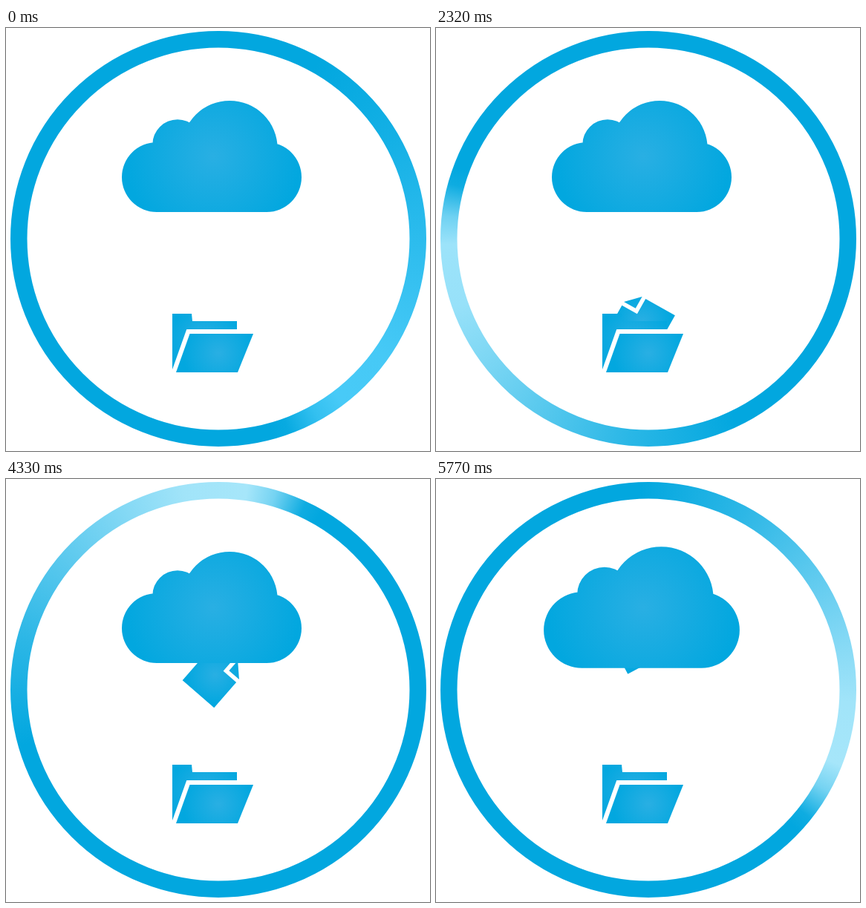
Animation, 571 px wide and 570 px high, one loop 5.8 s. Source, as an HTML page with a canvas:

```html
<!DOCTYPE html>
<html lang="en">
<head>
<meta charset="utf-8">
<title>Cloud upload</title>
<style>
  html, body { margin: 0; width: 100%; height: 100%; overflow: hidden; background: #fff; }
  canvas { display: block; }
</style>
</head>
<body>
<canvas id="stage" width="571" height="570"></canvas>
<script>
const ctx = document.getElementById('stage').getContext('2d');
const TAU = Math.PI * 2, RAD = Math.PI / 180;
const LOOP = 5800, STEPS = 90;
const BASE = [2, 167, 223], DIM = [72, 202, 247], BRIGHT = [166, 230, 250];

// Pace of the steps: time in ms, step reached.
const PACE = [[0, 0], [1460, 22], [2320, 34], [3320, 44], [3860, 52], [4740, 68], [5620, 84], [LOOP, STEPS]];

// Glow of the ring: degrees behind its front, strength.
const GLOW = [[136, 0], [105, .26], [57, .8], [40, .97], [22, 1], [14, .7], [5, .08], [0, 0]];

// Page poses, each held for a fifth of the steps: centre x, y, angle.
const POSES = [null, [278, 395, -60.6], [277.2, 317.5, -32.3], [281.6, 263.8, 41], [267, 219, -28]];

const mix = (a, b, k) => a.map((v, i) => v + (b[i] - v) * k);
const rgb = c => `rgb(${c.map(Math.round)})`;

function soft(x, y, r) {
  const g = ctx.createRadialGradient(x, y, 0, x, y, r);
  g.addColorStop(0, '#29afe3');
  g.addColorStop(1, rgb(BASE));
  return g;
}

function poly(...pts) {
  ctx.beginPath();
  pts.forEach(p => ctx.lineTo(...p));
  ctx.closePath();
}

function ring(step) {
  const front = 165 + 3.69 * step, span = GLOW[0][0];
  const light = mix(DIM, BRIGHT, Math.min(1, step / 38));
  const g = ctx.createConicGradient((front - span - 90) * RAD, 286, 284);
  for (const [back, k] of GLOW) g.addColorStop((span - back) / 360, rgb(mix(BASE, light, k)));
  ctx.strokeStyle = g;
  ctx.lineWidth = 22.5;
  ctx.beginPath();
  ctx.arc(286, 284, 268.75, 0, TAU);
  ctx.stroke();
}

function page([x, y, angle]) {
  ctx.save();
  ctx.translate(x, y);
  ctx.rotate(angle * RAD);
  ctx.translate(-28.5, -34.5);
  ctx.fillStyle = soft(28.5, 34.5, 40);
  poly([0.3, 0], [33.5, 0], [33.5, 23.5], [56.7, 23.5], [56.7, 69], [0.3, 69]);
  ctx.fill();
  poly([39, 0], [57, 18], [39, 18]);
  ctx.fill();
  ctx.restore();
}

function folder() {
  ctx.fillStyle = soft(268, 422, 50);
  poly([224, 385], [250, 385], [251, 395], [311, 395], [311, 464], [224, 464]);
  ctx.fill();
  // The white outline cuts the gap between back and front.
  poly([247.5, 412], [333, 412], [312, 464], [229, 464]);
  ctx.strokeStyle = '#fff';
  ctx.lineWidth = 12;
  ctx.stroke();
  ctx.fillStyle = soft(286, 438, 48);
  ctx.fill();
}

function cloud(scale) {
  ctx.save();
  ctx.translate(277, 173);
  ctx.scale(scale, scale);
  ctx.translate(-277, -173);
  ctx.fillStyle = soft(279, 173, 118);
  ctx.beginPath();
  for (const [x, y, r] of [[203, 201, 47], [351, 201, 47], [301.2, 162.4, 64.5], [231, 157, 33.7]]) {
    ctx.moveTo(x + r, y);
    ctx.arc(x, y, r, 0, TAU);
  }
  ctx.rect(203, 157, 148, 91);
  ctx.fill();
  ctx.restore();
}

function stepAt(ms) {
  const i = PACE.findIndex(([t]) => t > ms);
  const [[t0, s0], [t1, s1]] = PACE.slice(i - 1, i + 1);
  return Math.min(STEPS - 1, Math.round(s0 + (s1 - s0) * (ms - t0) / (t1 - t0)));
}

function draw(ms) {
  const step = stepAt(ms);
  const pose = Math.floor(step * POSES.length / STEPS);
  ctx.clearRect(0, 0, 571, 570);
  ring(step);
  if (POSES[pose]) page(POSES[pose]);
  folder();
  cloud(pose === POSES.length - 1 ? 1.09 : 1);
}

let start;
function tick(now) {
  start ??= now;
  draw((now - start) % LOOP);
  requestAnimationFrame(tick);
}
requestAnimationFrame(tick);
</script>
</body>
</html>
```
